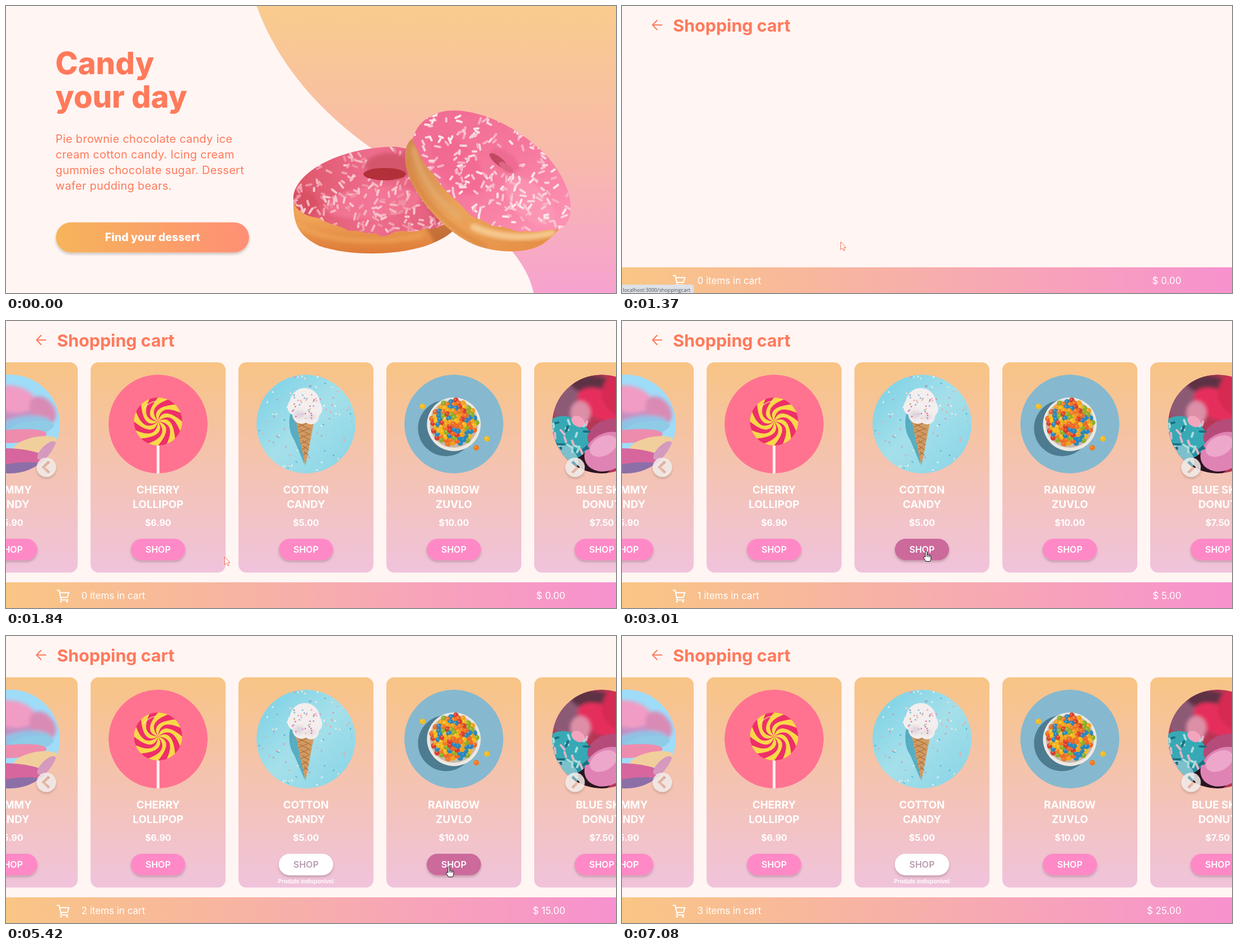
An HTML page that plays this animation: 1089 by 514 pixels, repeating every 8000 ms.

```html
<!DOCTYPE html>
<html lang="en">
<head>
<meta charset="utf-8">
<title>Candy shop</title>
<style>
html, body { margin: 0; width: 100%; height: 100%; overflow: hidden; background: #fff5f3; }
svg { display: block; width: 100vw; height: 100vh; }
text { font-family: Inter, "Open Sans", sans-serif; white-space: pre; }
</style>
</head>
<body>
<svg id="stage" viewBox="0 0 1089 514" xmlns="http://www.w3.org/2000/svg"></svg>
<script>
const LOOP = 8000;
const CORAL = '#ff7a5b';
const PINK = [255, 137, 198], PLUM = [203, 106, 155], WHITE = [255, 255, 255];

let seed = 7;
const rnd = () => (seed = (seed * 16807) % 2147483647) / 2147483647;
const span = (a, b) => a + (b - a) * rnd();
const pick = list => list[Math.floor(rnd() * list.length)];
const many = (n, fn) => Array.from({ length: n }, (_, i) => fn(i)).join('');

const txt = (x, y, s, size, weight = 400, fill = '#fff', extra = '') =>
  `<text x="${x}" y="${y}" font-size="${size}" font-weight="${weight}" fill="${fill}" ${extra}>${s}</text>`;
const mid = 'text-anchor="middle"';
const path = (d, fill, extra = '') => `<path d="${d}" fill="${fill}" ${extra}/>`;
const line = (d, color, w, extra = '') =>
  `<path d="${d}" fill="none" stroke="${color}" stroke-width="${w}" stroke-linecap="round" stroke-linejoin="round" ${extra}/>`;
const disc = (x, y, r, fill, extra = '') => `<circle cx="${x}" cy="${y}" r="${r}" fill="${fill}" ${extra}/>`;
const oval = (x, y, rx, ry, fill, turn = 0, extra = '') =>
  `<ellipse cx="${x}" cy="${y}" rx="${rx}" ry="${ry}" fill="${fill}" transform="rotate(${turn} ${x} ${y})" ${extra}/>`;
const pill = (x, y, w, h, fill, extra = '') =>
  `<rect x="${x}" y="${y}" width="${w}" height="${h}" rx="${h / 2}" fill="${fill}" ${extra}/>`;
const grad = (id, x2, y2, ...colors) =>
  `<linearGradient id="${id}" x1="0" y1="0" x2="${x2}" y2="${y2}">` +
  colors.map((c, i) => `<stop offset="${i / (colors.length - 1)}" stop-color="${c}"/>`).join('') +
  '</linearGradient>';
const clip = (id, shape) => `<clipPath id="${id}">${shape}</clipPath>`;
const soft = 'filter="url(#soft)"';

const ICING_L = 'M513 346C512 300 592 254 690 252C740 253 780 290 800 330V385C782 388 772 402 746 399C728 409 708 399 692 405Q672 419 661 407C640 410 634 400 612 403C596 392 575 392 560 380C538 378 514 366 513 346Z';
const DOUGH_L = 'M513 345C512 385 518 410 560 430C615 448 690 447 745 431C775 421 795 408 802 398L770 320Z';
const ICING_R = 'M726 240C732 208 762 187 800 187C860 188 925 226 965 268C995 302 1010 338 1008 365C1006 392 994 400 976 401C962 398 950 408 930 403C910 408 897 395 880 395C862 396 855 382 838 380C822 372 812 352 798 344C784 328 772 318 766 304C748 288 738 268 726 240Z';
const DOUGH_R = 'M726 237C712 246 710 268 714 288C728 345 785 405 835 427C880 445 935 443 960 425Q982 409 991 394L900 330Z';

const sprinkles = (n, x1, y1, x2, y2, colors) => many(n, () => {
  const x = span(x1, x2), y = span(y1, y2), a = span(0, Math.PI), l = span(2.5, 5.5);
  const dx = l * Math.cos(a), dy = l * Math.sin(a);
  return line(`M${(x - dx).toFixed(1)} ${(y - dy).toFixed(1)}l${(2 * dx).toFixed(1)} ${(2 * dy).toFixed(1)}`, pick(colors), 4);
});

function donuts() {
  return path(DOUGH_L, 'url(#doughL)') +
    `<g clip-path="url(#clipDL)">` +
    line('M522 392C555 416 640 430 740 412', '#f2a75c', 9, `opacity=".6" ${soft}`) +
    path('M740 380L810 360V430L770 432Z', '#a9552b', `opacity=".55" ${soft}`) + '</g>' +
    path(ICING_L, 'url(#iceL)') +
    `<g clip-path="url(#clipL)">` +
    oval(655, 352, 85, 28, '#f67a9c', -6, `opacity=".7" ${soft}`) +
    oval(530, 352, 30, 22, '#d64e60', 30, `opacity=".7" ${soft}`) +
    sprinkles(250, 513, 254, 800, 410, ['#f8b5bf', '#f4a2b0', '#fbc6cd', '#ef8fa2']) +
    oval(684, 287, 42, 24, '#d3566c', 0, soft) + oval(676, 301, 38, 11, '#b23039') +
    path('M712 262Q728 320 770 385H810V250Z', '#b73a4c', `opacity=".75" ${soft}`) +
    `</g>` +
    path(DOUGH_R, 'url(#doughR)') +
    `<g clip-path="url(#clipDR)">` +
    line('M728 255C742 318 775 352 810 378', '#e3ad72', 9, `opacity=".7" ${soft}`) +
    line('M835 396C870 412 920 420 975 406', '#f8d09a', 13, `opacity=".85" ${soft}`) +
    line('M714 275C735 350 800 405 855 430', '#d67a35', 7, `opacity=".55" ${soft}`) + '</g>' +
    path(ICING_R, 'url(#iceR)') +
    `<g clip-path="url(#clipR)">` +
    oval(805, 285, 34, 62, '#f0628c', -38, `opacity=".5" ${soft}`) +
    oval(935, 350, 55, 30, '#fd9dba', 45, `opacity=".6" ${soft}`) +
    sprinkles(270, 726, 188, 1008, 402, ['#fcd6dc', '#fbc6d2', '#fde6e6', '#f9b0c3']) +
    oval(890, 276, 30, 15, '#ee6c92', 36, soft) + oval(880, 278, 21, 7, '#c24862', 40) + oval(893, 289, 15, 6, '#dd6685', 36) +
    `</g>`;
}

function gummy(x) {
  return disc(x, 184, 89, '#9fdcf8') +
    `<g ${soft}>` + oval(x, 165, 75, 42, '#c58fc4', 12) + oval(x + 4, 140, 42, 24, '#f19cc4', 10) +
    oval(x + 58, 160, 28, 20, '#d98bb5', 50) + oval(x + 28, 185, 45, 15, '#8ec3e6', -6) + `</g>` +
    oval(x + 38, 192, 40, 13, '#8fcbe6', -8) + oval(x + 10, 206, 55, 12, '#ee8cae', -4) +
    oval(x + 45, 222, 40, 14, '#f1cf9c', -12) + oval(x + 12, 246, 62, 17, '#d6669d', 6) +
    oval(x + 30, 265, 50, 12, '#8d6fa7') + oval(x + 65, 232, 22, 9, '#d59abe', -45);
}

function lollipop(x) {
  const R = 43, at = (r, a) => `${(x + r * Math.cos(a)).toFixed(1)} ${(180 + r * Math.sin(a)).toFixed(1)}`;
  return disc(x, 184.5, 88.5, '#ff7391') + `<rect x="${x - 2.5}" y="220" width="5" height="54" fill="#fff0f0"/>` +
    disc(x, 180, R, '#ee2f69') + many(8, i => {
      const a = i * Math.PI / 4;
      return path(`M${x} 180Q${at(30, a - 1.3)} ${at(R, a)}A${R} ${R} 0 0 1 ${at(R, a + .42)}Q${at(33, a - .7)} ${x} 180Z`, '#f9d849');
    }) + line(`M${x - 26} 157q10 -12 22 -13`, '#ffe9a8', 2, 'opacity=".6"');
}

function cone(x) {
  return disc(x, 184.5, 88.5, 'url(#sky)') +
    many(100, () => oval(span(x - 88, x + 88).toFixed(1), span(98, 270).toFixed(1), 2, 1.1,
      pick(['#e9a5a8', '#f4e3d0', '#58b6d4', '#d98fae', '#f6f2f0']), span(0, 180) | 0)) +
    path(`M${x - 28} 165Q${x - 34} 195 ${x - 20} 215L${x - 3} 256L${x} 180Z`, '#3f9cb4', 'opacity=".75"') +
    path(`M${x - 18} 180L${x + 15} 177L${x - 1} 260Z`, '#d29a62') +
    many(6, i => line(`M${x - 15 + i * 2} ${190 + i * 10}l${22 - i * 3.4} -${9 - i}M${x - 13 + i * 2} ${184 + i * 10}l${22 - i * 3} ${11 - i}`, '#a76d3c', 1.1)) +
    [[-2, 147, 27], [-17, 154, 16], [12, 157, 17], [-8, 168, 16], [9, 171, 14]]
      .map(([dx, y, r]) => disc(x + dx, y, r, '#f4eeee')).join('') +
    oval(x - 12, 168, 10, 7, '#ddd5dc', 0, soft) + oval(x + 9, 172, 8, 5, '#e3d9df', 0, soft) +
    many(34, () => disc((x - 2 + span(-22, 22)).toFixed(1), span(129, 178).toFixed(1), 1.4, pick(['#e2779c', '#75b8d4', '#efb27d', '#d7a4d0'])));
}

function bowl(x) {
  const hues = ['#f4b91d', '#ee7a24', '#dc3f2c', '#2a87bd', '#8fae2b', '#f0a11e', '#ec6a28'];
  const candy = (cx, cy, c) => disc(cx, cy, 5, c) + disc(cx - 1.3, cy - 1.5, 1.2, '#fff', 'opacity=".4"');
  return disc(x, 184.5, 88.5, '#86b9cf') + oval(x - 14, 192, 50, 50, '#4d7c91') +
    disc(x, 185, 48, '#ece8e2') + disc(x, 184, 43, '#c7b8a8') +
    many(96, i => {
      const r = 4.15 * Math.sqrt(95.5 - i), a = i * 2.39996;
      return candy(+(x + r * Math.cos(a)).toFixed(1), +(182 + r * Math.sin(a)).toFixed(1), pick(hues));
    }) + candy(x - 56, 153, '#f4bd20') + candy(x + 59, 211, '#f4bd20') + candy(x + 40, 227, '#ee7a24');
}

function pastry(x) {
  return disc(x, 184.5, 88.5, '#b53655') +
    `<g clip-path="url(#clipP)"><g ${soft}>` + oval(x - 55, 140, 32, 44, '#8d5a76', 20) +
    oval(x - 5, 120, 55, 20, '#5d3145', 15) + oval(x, 150, 46, 26, '#e62f5d', 25) + oval(x - 38, 165, 18, 22, '#dd8fa8') +
    oval(x + 40, 130, 40, 40, '#d62b52') + `</g>` +
    oval(x - 36, 250, 58, 36, '#2a1520') + oval(x - 66, 210, 44, 38, '#27909f', 25) + oval(x - 58, 200, 40, 27, '#37a9b5', 25) +
    oval(x - 70, 245, 30, 22, '#7cc0cb', 30) + oval(x + 8, 200, 36, 22, '#b54b79', -25) +
    oval(x + 10, 234, 43, 33, '#df83b4', -28) + oval(x + 3, 224, 26, 17, '#eda7cb', -28) + oval(x - 42, 180, 13, 9, '#f2a5bd', 30) +
    sprinkles(30, x - 88, 178, x - 26, 235, ['#a9dcdc', '#e3b3c6', '#1c6f80']) + `</g>`;
}

const items = [
  ['GUMMY', 'CANDY', '$5.90', gummy],
  ['CHERRY', 'LOLLIPOP', '$6.90', lollipop],
  ['COTTON', 'CANDY', '$5.00', cone],
  ['RAINBOW', 'ZUVLO', '$10.00', bowl],
  ['BLUE SKY', 'DONUT', '$7.50', pastry]
];

function card([top, low, price, draw], i) {
  const left = -113 + 264 * i, x = left + 120.5;
  return `<rect x="${left}" y="74" width="241" height="376.5" rx="14" fill="url(#card)"/>` +
    `<g clip-path="url(#pic${i})">${draw(x)}</g>` +
    txt(x, 308.7, top, 18.9, 700, '#fff', mid) + txt(x, 335, low, 18.9, 700, '#fff', mid) +
    txt(x, 367, price, 16, 700, '#fff', mid) +
    pill(x - 48.5, 390, 97, 38.5, '#ff89c6', `id="btn${i}" filter="url(#drop)"`) +
    txt(x, 414.7, 'SHOP', 16, 600, '#fff', `${mid} id="lbl${i}"`);
}

const chevron = (x, dir) =>
  `<mask id="cut${x}">${disc(x, 262, 17.5, '#fff')}${line(`M${x + 5 * dir} 252L${x - 5 * dir} 262L${x + 5 * dir} 272`, '#000', 5, 'style="stroke-linecap:butt;stroke-linejoin:miter"')}</mask>` +
  `<g filter="url(#drop)">${disc(x, 262, 17.5, '#f3eeec', `opacity=".85" mask="url(#cut${x})"`)}</g>`;

const stage = document.getElementById('stage');
stage.innerHTML = `<defs>
${grad('wave', 0, 1, '#f9cc8d', '#f8bba9', '#f7a2d0')}
${grad('cta', 1, 0, '#f4ab43', '#ff8062')}
${grad('card', 0, 1, '#f8c485', '#f4c3b1', '#f0c3dc')}
${grad('bar', 1, 0, '#f9c684', '#f7aeac', '#f791cf')}
${grad('sky', 1, 1, '#78cfe6', '#a5e0ea', '#86d3e6')}
${grad('doughL', 0, 1, '#f0a65c', '#efa357', '#dd7a38')}
${grad('doughR', 1, 1, '#d18a50', '#eba45a', '#e58a41')}
${grad('iceL', 1, 0, '#dd5668', '#ee6d8e', '#e05c78')}
${grad('iceR', 1, 1, '#f06a90', '#f6779d', '#fd96b7')}
<filter id="soft" x="-30%" y="-50%" width="160%" height="200%"><feGaussianBlur stdDeviation="3"/></filter>
<filter id="drop" x="-20%" y="-20%" width="140%" height="160%"><feDropShadow dx="0" dy="3" stdDeviation="2" flood-color="#000" flood-opacity=".2"/></filter>
${clip('clipL', path(ICING_L, '#000'))}${clip('clipDL', path(DOUGH_L, '#000'))}
${clip('clipR', path(ICING_R, '#000'))}${clip('clipDR', path(DOUGH_R, '#000'))}
${clip('clipP', disc(1063.5, 184.5, 88.5, '#000'))}
${many(5, i => clip(`pic${i}`, disc(7.5 + 264 * i, 184.5, 88.5, '#000')))}
</defs>
<rect width="1089" height="514" fill="#fff5f3"/>
<g id="home">
${path('M447.5 0C485 104 560 189 650 253C740 305 845 370 905 441C925 466 937 490 942 514H1089V0Z', 'url(#wave)')}
${donuts()}
${txt(88, 122, 'Candy', 54.5, 800, CORAL)}${txt(88, 182, 'your day', 54.5, 800, CORAL)}
${['Pie brownie chocolate candy ice', 'cream cotton candy. Icing cream', 'gummies chocolate sugar. Dessert', 'wafer pudding bears.']
    .map((s, i) => txt(88.5, 245 + 28 * i, s, 20, 400, CORAL, 'letter-spacing=".3"')).join('')}
<g filter="url(#drop)">${pill(89, 387.5, 345, 54, '#fff5f3')}${pill(89, 387.5, 345, 54, 'url(#cta)', 'id="cta-fill"')}</g>
${txt(261.7, 421, 'Find your dessert', 19.6, 800, '#fff', mid)}
</g>
<g id="shop">
${line('M71 34H54.5M62.5 25.8L54.5 34L62.5 42.2', CORAL, 2)}
${txt(91, 46, 'Shopping cart', 30.5, 700, CORAL)}
<g id="cards">${items.map(card).join('')}
${txt(535.3, 443, 'Produto indisponivel', 10, 600, '#fff', `${mid} id="note"`)}
${chevron(72, 1)}${chevron(1016, -1)}</g>
<rect y="468" width="1089" height="46" fill="url(#bar)"/>
${line('M91.5 482.5H95L98.5 499.5H110.5M96 486.5H112.5L109.5 495H97.5', '#fff', 2)}${disc(98, 502.5, 1.8, '#fff')}${disc(109, 502.5, 1.8, '#fff')}
${txt(134.5, 498, '', 17, 400, '#fff', 'id="count"')}
${txt(998.5, 498, '', 17, 400, '#fff', 'text-anchor="end" id="total"')}
</g>
<g id="status"><path d="M0 499H125Q128 499 128 502V514H0Z" fill="#dee1e6"/>
${txt(1.5, 511.5, 'localhost:3000/shoppingcart', 9.1, 400, '#4a4d51', 'style="font-family:\'Open Sans\',sans-serif"')}</g>
${disc(0, 0, 10, '#fbb829', 'id="ring" opacity=".85"')}
<g id="cursor">
<path id="arrow" d="M.5 .5V14.5L3.7 11.6L5.9 16.2L8 15.2L5.9 10.7H10Z" fill="#fff" stroke-width="1"/>
<path id="hand" d="M-1.5 11V1.8Q-1.5 .5 0 .5T1.5 1.8V6.8Q3 5.6 4 7.2Q5.6 6.2 6.4 8Q8.6 7.4 8.6 9.6V13Q8.6 15.5 7 18.5H-.8Q-2 15.5 -4.4 12.4Q-5.4 10.6 -3.6 10.2Q-2.4 10.2 -1.5 11ZM1.5 7V10.5M4 7.5V10.8M6.4 8V11" fill="#fff" stroke="#111" stroke-width="1"/>
</g>`;

const el = id => document.getElementById(id);
const show = (id, on) => el(id).setAttribute('visibility', on ? 'inherit' : 'hidden');
const set = (id, key, value) => el(id).setAttribute(key, value);
const clamp = v => Math.max(0, Math.min(1, v));
const ramp = (t, a, b) => clamp((t - a) / (b - a));
const lerp = (a, b, k) => a + (b - a) * k;
const mix = (a, b, k) => `rgb(${a.map((v, i) => Math.round(lerp(v, b[i], k)))})`;
const within = (t, a, b) => t >= a && t < b;
const smooth = k => k * k * (3 - 2 * k);

// pointer trips: start, end, number of steps, from, to
const trips = [
  [70, 770, 10, [1000, 492], [390, 422]],
  [2390, 2780, 6, [390, 422], [543, 412]],
  [4410, 5190, 11, [543, 412], [790.5, 413]],
  [6440, 7080, 9, [790.5, 413], [1089, 6]]
];

function pointer(t) {
  let pos = trips[0][3];
  for (const [a, b, n, from, to] of trips) {
    if (t < a) break;
    const k = smooth(clamp((Math.floor((t - a) / (b - a) * (n - 1) + .001) + .5) / (n - .5)));
    pos = t >= b ? to : [lerp(from[0], to[0], k), lerp(from[1], to[1], k)];
  }
  return pos;
}

const clicks = [[1220, 1370], [2860, 2930], [3790, 3950], [5270, 5420], [5910, 6050]];

function draw(t) {
  const home = t < 1370, [x, y] = pointer(t);
  show('home', home);
  show('shop', !home);
  show('cards', t >= 1840);
  set('cta-fill', 'opacity', lerp(.87, 1, ramp(t, 620, 840)));
  set('status', 'opacity', ramp(t, 1010, 1150) * (1 - ramp(t, 1660, 1840)));

  const sold = ramp(t, 3760, 3940);
  set('btn2', 'fill', sold ? mix(PLUM, WHITE, sold) : mix(PINK, PLUM, ramp(t, 2630, 2800)));
  set('lbl2', 'fill', mix(WHITE, [185, 155, 178], sold));
  show('note', t >= 3870);
  set('btn3', 'fill', mix(PINK, PLUM, ramp(t, 4950, 5130) * (1 - ramp(t, 6560, 6720))));

  const n = (t >= 2930) + (t >= 5350) + (t >= 5980);
  el('count').textContent = `${n} items in cart`;
  el('total').textContent = `$ ${[0, 5, 15, 25][n]}.00`;

  const overShop = y > 388 && y < 430 && (Math.abs(x - 535.5) < 48 || Math.abs(x - 799.5) < 48);
  const hand = home ? t >= 910 : overShop;
  show('cursor', within(t, 70, 7080));
  set('cursor', 'transform', `translate(${x} ${y})`);
  show('hand', hand);
  show('arrow', !hand);
  set('arrow', 'stroke', within(t, 1370, 2390) ? '#f0704f' : '#111');

  show('ring', clicks.some(([a, b]) => within(t, a, b)));
  set('ring', 'transform', `translate(${x} ${y + .5})`);
}

const start = performance.now();
function tick() {
  draw((performance.now() - start) % LOOP);
  requestAnimationFrame(tick);
}
tick();
</script>
</body>
</html>
```
